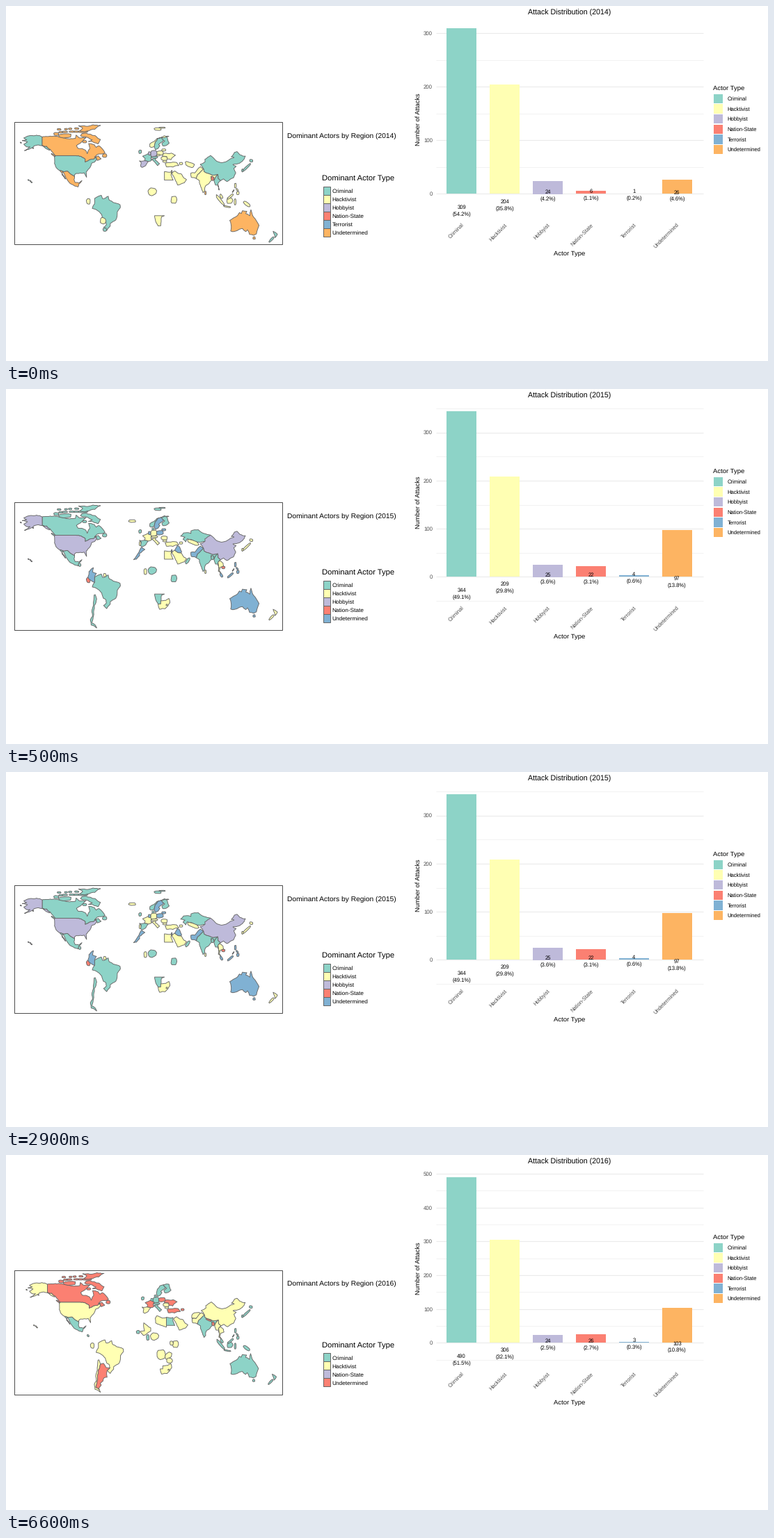
Write a matplotlib script that moves like this. It is 1095 by 511 pixels and loops after 8 s.

```python
import math
import random

import matplotlib.pyplot as plt
from matplotlib.animation import FuncAnimation
from matplotlib.patches import Polygon, Rectangle

W, H, DPI = 1095, 511, 100
PX = 72 / DPI
TEAL, YELLOW, PURPLE = "#8dd3c7", "#ffffb3", "#bebada"
RED, BLUE, ORANGE = "#fb8072", "#80b1d3", "#fdb462"
COLORS = [TEAL, YELLOW, PURPLE, RED, BLUE, ORANGE]
ACTORS = ["Criminal", "Hacktivist", "Hobbyist", "Nation-State", "Terrorist", "Undetermined"]
GREY, OUTLINE = "#4d4d4d", "#666666"

plt.rcParams.update({"font.family": "Liberation Sans", "text.hinting": "none"})
fig = plt.figure(figsize=(W / DPI, H / DPI), dpi=DPI, facecolor="white")
ax = fig.add_axes([0, 0, 1, 1])
ax.set(xlim=(0, W), ylim=(H, 0))
ax.axis("off")

shapes = {}


def rough(a, b):
    """Points from a up to b, bent at random; neighbours get the same border."""
    dx, dy = b[0] - a[0], b[1] - a[1]
    if math.hypot(dx, dy) < 3 or dx == 0 or dy == 0:
        return [a]
    bend = random.Random(str(sorted([a, b]))).uniform(-0.09, 0.09) * (1 if a < b else -1)
    mid = ((a[0] + b[0]) / 2 - bend * dy, (a[1] + b[1]) / 2 + bend * dx)
    return rough(a, mid) + rough(mid, b)


def land(code, *corners):
    """Outline through a few lon/lat corners; level and upright borders stay straight."""
    outline = []
    for a, b in zip(corners, corners[1:] + corners[:1]):
        outline += rough(a, b)
    shapes.setdefault(code, []).append(outline)


def blob(code, lon, lat, w, h, tilt=0):
    """Small rounded piece of land with a random edge."""
    rng = random.Random(f"{code}{lon}")
    t = math.radians(tilt)
    outline = []
    for k in range(11):
        a = math.tau * k / 11
        r = rng.uniform(0.85, 1.1) / 2
        x = w * r * math.copysign(abs(math.cos(a)) ** 0.75, math.cos(a))
        y = h * r * math.copysign(abs(math.sin(a)) ** 0.75, math.sin(a))
        outline.append((lon + x * math.cos(t) - y * math.sin(t),
                        lat + x * math.sin(t) + y * math.cos(t)))
    shapes.setdefault(code, []).append(outline)


def north_america():
    lakes = [(-67.8, 47.1), (-71.4, 45.2), (-74.9, 45), (-79, 43.3), (-82.6, 42),
             (-82.6, 45.3), (-84.6, 46.5), (-88.4, 48.3), (-95.2, 49), (-123, 49)]
    rio = [(-97.1, 25.9), (-103, 29), (-106.5, 31.8), (-111, 31.3), (-117.1, 32.5)]
    panhandle = [(-130, 55.9), (-135, 59.4), (-141, 60.3), (-141, 69.7)]
    land("CA", *lakes, *panhandle, (-128, 70.2), (-108, 67.8), (-96, 68), (-95, 71.8), (-91, 68.8),
         (-81.5, 69), (-87, 64.5), (-94.5, 60), (-92.3, 57), (-82.3, 55.1), (-79.9, 51.2),
         (-76.5, 56.5), (-78, 62.3), (-70, 61), (-67.6, 58.2), (-64, 60), (-55.7, 52.1),
         (-66.4, 50.2), (-70, 47.3), (-64.8, 48.8), (-61, 45.5), (-66, 43.7))
    land("US", *lakes, (-124.6, 48.2), (-124.3, 40.3), (-120.6, 34.6), *rio[::-1], (-97.2, 27.7),
         (-94.7, 29.4), (-84, 30), (-82.7, 28), (-80.7, 25.1), (-81.3, 31), (-76, 36), (-73.9, 40.6),
         (-70, 41.8), (-67, 44.8))
    land("US", *panhandle, (-156.5, 71.3), (-166, 68.6), (-162, 66.6), (-168, 65.6), (-161, 64.3),
         (-166, 61.6), (-162, 58.7), (-157.5, 58.8), (-165, 54.6), (-152, 59.8), (-140, 59.7),
         (-131.1, 55))
    land("MX", *rio, (-112.8, 27.8), (-109.5, 23.2), (-114.2, 28), (-113, 31.2), (-109.4, 25.8),
         (-105.4, 20.5), (-101.7, 17.6), (-92.2, 14.5), (-91, 17.8), (-87, 21.5), (-91, 18.8),
         (-96.3, 19.3), (-97.8, 22.4))
    for lon, lat in [(-155.5, 19.6), (-157, 21), (-159.5, 22), (-153.5, 57.4), (-170, 63.4)]:
        blob("US", lon, lat, 1.8, 0.9, -20)
    land("CA", (-89, 71), (-87, 73.3), (-76, 72.8), (-61.9, 66.9), (-65, 62), (-78, 64.6), (-73, 66.5))
    blob("CA", -110, 71, 17, 4.6)
    blob("CA", -122, 73, 7, 3.2)
    blob("CA", -56, 49, 6, 4)
    blob("CA", -126, 49.7, 6, 1.2, -30)
    blob("CA", -83.5, 64.5, 6, 2.5)
    blob("CA", -86, 75.4, 14, 1.8)
    land("CA", (-90, 76.5), (-86, 79.5), (-91.6, 81.9), (-72, 83.1), (-62, 82.4), (-78, 76.3))
    rng = random.Random(3)
    for k in range(8):
        blob("CA", -117 + 8 * (k % 4) + rng.uniform(-2, 2), 78 - 3 * (k // 4) + rng.uniform(-1, 1),
             rng.uniform(4, 8), 1.8)
    blob("GT", -90.2, 15.6, 3.5, 3.5)
    blob("CR", -84.2, 10, 3, 2, -40)


def south_america():
    andes = [(-67, -23), (-70, -30), (-71.1, -36.7), (-71.9, -44), (-73.4, -50), (-68.6, -52.6)]
    land("CL", *andes, (-66.8, -55.6), (-74.5, -52.3), (-75.6, -46.6), (-72.7, -42.4),
         (-73.6, -37.2), (-71.4, -30), (-70.4, -18.3), (-69, -18))
    land("AR", *andes, (-69.1, -50.7), (-65.8, -47.2), (-67.3, -45.5), (-63.5, -42.6), (-62.1, -39),
         (-57.7, -38.2), (-58.4, -34), (-57.6, -30.2), (-53.8, -27.2), (-58.6, -27.1), (-62.8, -22))
    land("BR", (-51.3, 4.2), (-50, 0), (-44.6, -2.7), (-35.2, -5.3), (-34.8, -8), (-39, -13),
         (-39.2, -17.6), (-41, -22), (-48.5, -25.9), (-48.6, -28.7), (-53.4, -33.8), (-57.6, -30.2),
         (-53.8, -27.2), (-54.3, -24), (-57.9, -22.1), (-60.2, -16), (-65.3, -12), (-73, -9.3),
         (-70, -4.3), (-69.8, 1.7), (-64.8, 4.1), (-60.7, 5.2), (-59, 1.5))
    land("CO", (-78.8, 1.4), (-77.5, 8), (-71.4, 12.4), (-72.5, 7.5), (-67.4, 6), (-69.8, 1.7),
         (-70, -4.3))
    blob("EC", -78.3, -1.6, 5.5, 6)
    blob("SR", -56, 4, 3.6, 4)
    blob("PY", -58.4, -23.2, 8, 7, -20)
    blob("UY", -56, -32.8, 5, 4)


def europe():
    land("NO", (5.1, 59), (5.2, 62), (10.5, 64.5), (15, 68), (25, 71), (31, 70.3), (20.6, 69.1),
         (16, 68), (12.4, 64), (11, 59), (7, 58.1))
    land("SE", (11, 59), (12.4, 64), (16, 68), (20.6, 69.1), (23.9, 66), (17.1, 61.3), (18.8, 60),
         (16.4, 57), (13, 55.4))
    land("FI", (20.6, 69.1), (28.6, 69.8), (31.5, 62.9), (28, 60.5), (22.9, 59.8), (21.5, 62.6),
         (25.4, 65.1), (23.9, 66))
    land("IT", (7.1, 45), (13.8, 46.5), (12.5, 44), (18.4, 40.2), (15.7, 38), (10.5, 42.9))
    land("FR", (-4.6, 48.4), (2.5, 51.1), (8.1, 49), (6.5, 46.3), (7.5, 43.8), (3, 42.5),
         (-1.9, 43.4), (-1.2, 46))
    land("ES", (-9, 43.3), (-1.9, 43.4), (3, 42.5), (-0.5, 38), (-5.4, 36), (-7.3, 37.2), (-6.4, 41.4))
    land("UA", (22.1, 48.4), (24, 51.5), (34.4, 51.8), (40, 49.5), (35, 46.3), (33.9, 44.5),
         (28.7, 45.3), (28, 48))
    land("TR", (26, 40.4), (31, 41.3), (41.5, 41.5), (44.5, 38), (36.5, 36.4), (27.6, 36.7))
    blob("NO", 16, 78.3, 10, 3)
    blob("NO", 22, 79.9, 9, 1.2)
    blob("IS", -18.8, 65, 10, 2.8)
    blob("IE", -8, 53.3, 4, 3.8)
    blob("PT", -8.2, 39.4, 2.4, 4.8)
    blob("DE", 10.4, 51.2, 8.6, 7)
    blob("NL", 4.8, 51.4, 3.6, 3.8)
    blob("DK", 9.7, 56.1, 3, 2.6)
    blob("CH", 11.5, 47.2, 9, 2.2)
    blob("CZ", 16, 49.7, 6, 1.8)
    blob("PL", 19.2, 52, 9.6, 5)
    blob("LT", 24, 55.3, 5.5, 2.4)
    blob("RO", 25, 45.8, 8.5, 4.4)
    blob("BG", 25.4, 42.7, 5.6, 2.2)
    blob("AZ", 47.6, 40.3, 4.6, 2.6)


def africa():
    land("EG", (25, 31.4), (34.3, 31.2), (34, 27.5), (36.9, 22), (25, 22))
    land("LY", (9.5, 30.3), (11.5, 33.1), (19, 30.5), (25, 31.4), (25, 20), (14.9, 23), (10, 24.9))
    land("ML", (-11.7, 14.8), (-5.5, 15.5), (-6.5, 25), (3.2, 19.1), (3.2, 15.4), (-7, 10.3))
    land("MA", (-17, 21.4), (-9.6, 30), (-5.9, 35.6), (-1.5, 33), (-8.7, 28.7), (-8.7, 26), (-13, 22))
    land("NA", (11.7, -17.3), (25, -17.3), (21, -18.5), (19.9, -28.5), (16.3, -28.6))
    land("ZA", (16.3, -28.6), (19.9, -28.5), (20, -25), (26.5, -24.6), (31.2, -22.3), (32.5, -27),
         (26, -33.9), (18.3, -34.5))
    blob("ZA", 28.2, -29.5, 2, 1.6)
    blob("SN", -14.5, 14.2, 5, 3.6)
    blob("GH", -1, 8, 4, 6.2)
    blob("NG", 8.6, 9.2, 11, 8.5, 10)
    blob("KE", 38, 0.2, 8, 8.5)
    blob("UG", 32.2, 1.3, 4.6, 5)
    blob("AO", 17.8, -11.8, 11.5, 11.5)
    blob("ZM", 27.7, -13.3, 11, 6.5, 30)
    blob("ZW", 29.2, -19, 8, 6)


def asia():
    himalaya = [(78, 34.5), (78.7, 31.5), (81.1, 30.2), (88.8, 27.8), (97.4, 28.3)]
    land("CN", *himalaya, (97.8, 24), (101.2, 21.4), (105.3, 23.3), (110, 20.4), (118.7, 24.5),
         (121.9, 30), (119.2, 35), (122.4, 37.4), (118, 39.2), (124.3, 40), (131, 42.9), (135, 48.5),
         (127.5, 50), (123.6, 53.5), (120, 52.5), (115.7, 47.7), (119.7, 47), (111.9, 43.9),
         (105, 41.6), (96.3, 42.7), (87.6, 49.2), (80, 45), (80.2, 42.2), (73.7, 39.4))
    land("IN", *himalaya, (92.7, 22), (92.4, 25), (88.1, 26), (89, 21.7), (82.2, 16.6), (80, 14),
         (79.9, 10.4), (77.5, 8), (74.4, 14.6), (72.6, 21.4), (68.2, 23.7), (70, 28), (74.5, 31.5))
    land("PK", (61.5, 25.1), (60.9, 29.8), (66.3, 29.9), (70, 34), (74, 36.8), (78, 34.5),
         (74.5, 31.5), (70, 28), (68.2, 23.7))
    land("KZ", (47, 48), (51, 51.6), (61, 51), (61, 53.9), (71, 55.2), (80, 50.8), (87.4, 49.2),
         (80.2, 42.2), (66, 42), (61, 44.3), (56, 45), (54, 41.5), (50.3, 44.5), (53, 46.9))
    land("SA", (35, 29.4), (39.2, 32.1), (44.7, 29.2), (48.4, 28.5), (51.6, 24.2), (55, 22.5),
         (52, 19), (43, 16.5))
    land("IQ", (39, 32.1), (42.3, 37.2), (45.5, 36), (48.5, 29.9), (44.7, 29.2))
    land("MM", (92.3, 21.5), (97.4, 28.3), (97.8, 24), (101.2, 21.4), (97.8, 18.5), (99.2, 11),
         (97.5, 16.5), (94.4, 16.5))
    land("TH", (97.8, 18.5), (100, 20.4), (104.7, 17.4), (105.4, 14.3), (100.8, 13), (99.3, 9.3),
         (101.6, 6.5), (98.2, 8.4), (99.2, 12))
    blob("IL", 35, 31.3, 1.2, 3.4)
    blob("OM", 56.6, 20.2, 8, 3.6, 50)
    blob("TM", 59.6, 39.2, 13, 5, -15)
    blob("UZ", 64, 41, 16, 4.4, -18)
    blob("AF", 66.2, 33.6, 12.5, 6.5, 15)
    blob("NP", 84.2, 28.2, 8, 1.7, -18)
    blob("BD", 90.2, 23.9, 3.4, 4.8)
    blob("LK", 80.7, 7.8, 2, 3.8)
    blob("KH", 105, 12.6, 4.6, 3)
    blob("MY", 102.3, 4, 5.5, 2.8, -55)
    blob("MY", 114.5, 3.8, 10, 2.2, 35)
    blob("ID", 100.6, 0, 15, 3, -45)
    blob("ID", 110, -7.3, 10, 1.4, -8)
    blob("ID", 113.8, -0.6, 8, 7)
    blob("ID", 121, -2, 2.4, 7)
    blob("ID", 137, -4.4, 10, 4, -30)
    blob("PH", 121.4, 15.8, 2.4, 5.6)
    blob("PH", 123.8, 11.3, 4, 1.6, -40)
    blob("PH", 124.8, 7.6, 3.4, 3.8)
    blob("PH", 118.4, 9.8, 3.6, 0.8, 50)
    blob("JP", 136.6, 36, 13, 2.3, 38)
    blob("JP", 143, 43.4, 4.6, 3)
    blob("JP", 131, 32.6, 2.2, 3.2)


def oceania():
    land("AU", (113.7, -22.5), (115.7, -31.6), (115, -34.2), (118, -35), (123.6, -33.9), (131, -31.5),
         (135.6, -34.9), (137.8, -32.9), (140.6, -38), (146.3, -39), (150, -37.4), (153.5, -28),
         (146.3, -19), (142.5, -10.7), (140.9, -17.4), (135.5, -15), (136.9, -12.4), (131, -11.8),
         (129.5, -14.9), (127, -13.9), (122, -18.5))
    blob("AU", 146.8, -42, 3.4, 2.8)
    land("NZ", (172.6, -34.5), (178.5, -37.7), (175.2, -41.6), (174.6, -38.4))
    blob("NZ", 170.4, -43.6, 8.6, 2.4, 42)


# half: half the map frame's height; x0, kx: x of lon 0 and pixels per degree
YEARS = [
    dict(year=2014, counts=[309, 204, 24, 6, 1, 26], half=88, south=-46.6, x0=201.2, kx=1.058,
         legend=ACTORS,
         fills={TEAL: "US BR UY IE FR SE FI IT CH CN MM JP NZ",
                YELLOW: "NO PL CZ UA RO BG LT TR AZ TM IL EG SA PK IN NG KE NA ID MY PH EC PY",
                PURPLE: "DE NL ES", RED: "BD", ORANGE: "CA MX AU LK"}),
    dict(year=2015, counts=[344, 209, 25, 22, 4, 97], half=92, south=-55.6, x0=201.2, kx=1.058,
         legend=ACTORS[:4] + ACTORS[5:],
         fills={TEAL: "CA MX GT BR CL IE ES NO FI DK KZ IN BD OM MM NG KE NA",
                YELLOW: "IS PT FR DE IT CH RO BG TR AZ UZ EG SA LK TH GH ZA SR JP NZ",
                PURPLE: "US CN", RED: "EC KH", BLUE: "CO SE PL LT NL IQ IL PK MA PH MY AU"}),
    dict(year=2016, counts=[490, 306, 24, 26, 3, 103], half=89.5, south=-55.6, x0=204.7, kx=1.03,
         legend=ACTORS[:2] + [ACTORS[3], ACTORS[5]],
         fills={TEAL: "MX CR IE DE NL DK SE FI IT CH EG SN GH IN JP PH ID MY AU NZ",
                YELLOW: "US BR CL EC ES RO BG LY ML NG KE UG AO ZM ZW ZA SA AF PK CN MM TH",
                RED: "CA AR FR PL UA TR AZ NP BD"}),
]

NORTH, MIDDLE = 83.1, 255.5
BASE, PEAK = 270.5, 32
LEFT, RIGHT = 617.5, 1001.5
GAP = (RIGHT - LEFT) / 6.2


def write(x, y, s, size, color="black", ha="left"):
    return ax.text(x, y + 0.36 * size, s, fontsize=size * PX, color=color, ha=ha,
                   va="baseline", zorder=5)


def rect(x, y, w, h, fill, edge="none"):
    return ax.add_patch(Rectangle((x, y), w, h, facecolor=fill, edgecolor=edge, lw=PX, zorder=3))


def bar_x(i):
    return LEFT + (0.6 + i) * GAP


def draw_static():
    write(809.5, 355.5, "Actor Type", 9.5, ha="center")
    ax.text(592.5, 163, "Number of Attacks", fontsize=9.3 * PX, rotation=90, ha="center", va="center")
    write(1016, 117.5, "Actor Type", 9.5)
    for i, (name, color) in enumerate(zip(ACTORS, COLORS)):
        y = 133.5 + 14.6 * i
        rect(1016.8, y - 6.7, 13.4, 13.4, color)
        write(1036.5, y, name, 7.7)
        ax.text(bar_x(i) + 4.5, 311.5, name, fontsize=7.7 * PX, color=GREY, rotation=45,
                ha="right", va="top")


def draw_map(d):
    top, bottom = MIDDLE - d["half"], MIDDLE + d["half"]
    ky = (bottom - top - 7) / (NORTH - d["south"])
    out = [rect(12, top, 385, bottom - top, "none", GREY)]
    for color, codes in d["fills"].items():
        for outline in (o for code in codes.split() for o in shapes[code]):
            pts = [(d["x0"] + d["kx"] * lon, top + 3.5 + ky * (NORTH - lat)) for lon, lat in outline]
            out.append(ax.add_patch(Polygon(pts, facecolor=color, edgecolor=OUTLINE, lw=0.9 * PX,
                                            joinstyle="round", zorder=2)))
    out.append(write(404, top + 18.5, f"Dominant Actors by Region ({d['year']})", 10.2))
    first = bottom - 17.5 - 12 * (len(d["legend"]) - 1)
    out.append(write(454.5, first - 18, "Dominant Actor Type", 11.2))
    for i, (name, color) in enumerate(zip(d["legend"], COLORS)):
        y = first + 12 * i
        out += [rect(455.5, y - 6, 10.5, 12, color, OUTLINE), write(468.5, y, name, 8.3)]
    return out


def draw_bars(d):
    counts = d["counts"]
    unit = (BASE - PEAK) / max(counts)
    out = [write(809.5, 8.5, f"Attack Distribution ({d['year']})", 10.6, ha="center")]
    for v in range(-50, 501, 50):
        y = BASE - v * unit
        if not 20 < y < 308:
            continue
        major = v % 100 == 0
        out += ax.plot([LEFT, RIGHT], [y, y], color="#ebebeb", zorder=1,
                       lw=(1.1 if major else 0.6) * PX, solid_capstyle="butt")
        if major:
            out.append(write(613, y, str(v), 7.8, GREY, "right"))
    for i, n in enumerate(counts):
        x, h = bar_x(i), n * unit
        y = 265.8 + 23.3 * n / max(counts)
        out += [rect(x - 0.35 * GAP, BASE - h, 0.7 * GAP, h, COLORS[i]),
                write(x, y, str(n), 7.7, ha="center"),
                write(x, y + 10.3, f"({n / sum(counts):.1%})", 7.7, ha="center")]
    return out


for region in (north_america, south_america, europe, africa, asia, oceania):
    region()
draw_static()
scenes = [draw_map(d) + draw_bars(d) for d in YEARS]


def update(i):
    current = 0 if i < 1 else 1 if i < 9 else 2
    for k, scene in enumerate(scenes):
        for artist in scene:
            artist.set_visible(k == current)
    return []


update(0)
anim = FuncAnimation(fig, update, frames=16, interval=500, repeat=True, repeat_delay=0, blit=False)
plt.show()
```
